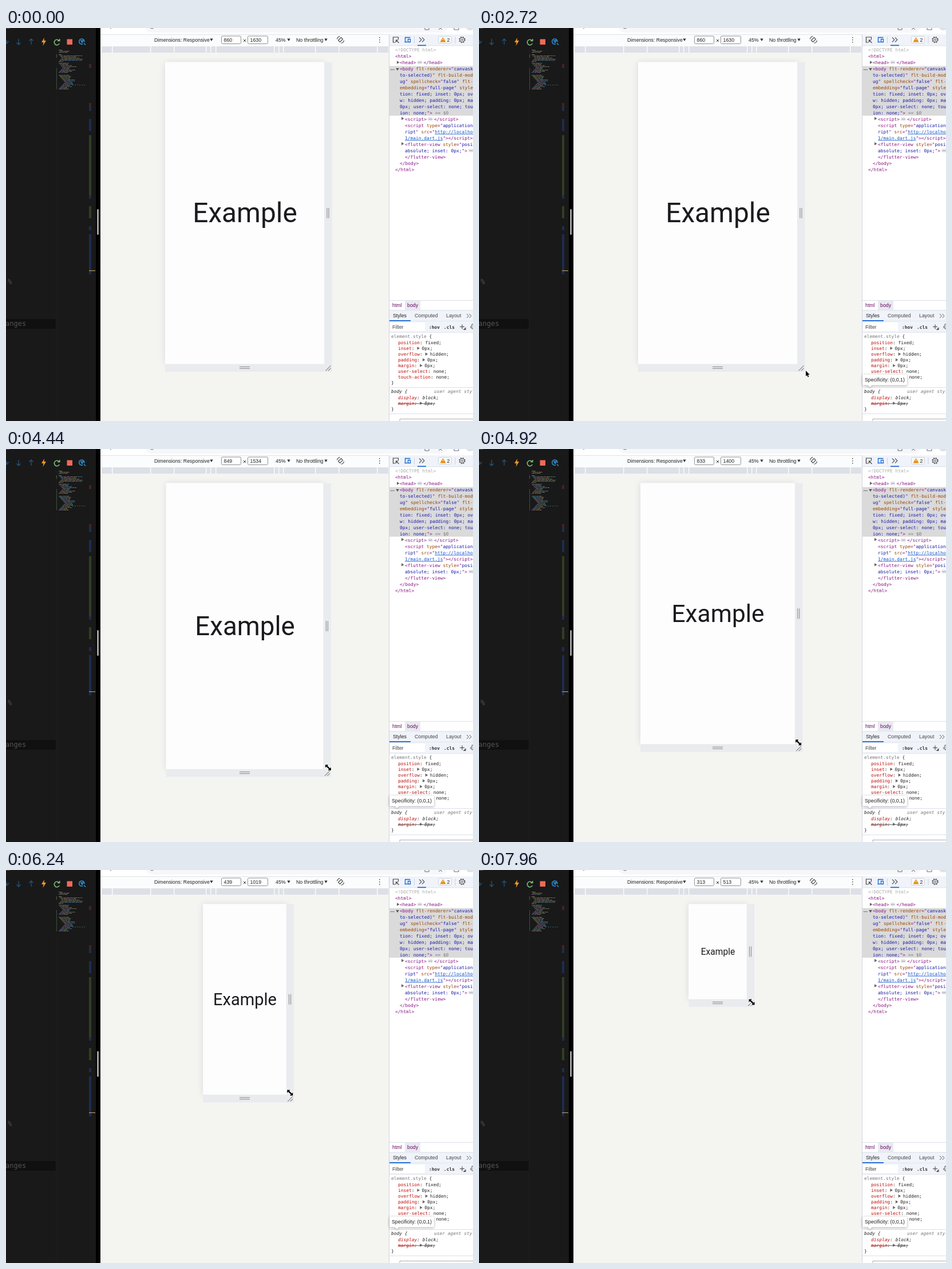
Recreate the animation shown at these times as an HTML page with a canvas. Size 816 by 686 pixels, loop 8000 ms.

```html
<!DOCTYPE html>
<html lang="en">
<head>
<meta charset="utf-8">
<title>Responsive resize</title>
<style>
html, body { margin: 0; width: 100%; height: 100%; overflow: hidden; background: #181818; }
canvas { display: block; }
</style>
</head>
<body>
<canvas id="stage" width="816" height="686"></canvas>
<script>
const ctx = document.getElementById('stage').getContext('2d');
const LOOP = 8000, ZOOM = 0.3232, CENTER = 417, TOP = 59.6;
const SANS = '8.8px "Liberation Sans", Arial, sans-serif';
const MONO = '7.88px "DejaVu Sans Mono", monospace';
const INK = { t: '#881280', a: '#994500', v: '#1a1aa6', g: '#a9a9a9', e: '#777', k: '#222', r: '#c00a0a', u: '#1155cc' };

function rect(x, y, w, h, color) {
  ctx.fillStyle = color;
  ctx.fillRect(x, y, w, h);
}
function round(x, y, w, h, r, fill, stroke) {
  ctx.beginPath();
  ctx.roundRect(x, y, w, h, r);
  if (fill) { ctx.fillStyle = fill; ctx.fill(); }
  if (stroke) { ctx.strokeStyle = stroke; ctx.lineWidth = 1; ctx.stroke(); }
}
function path(d, x, y, stroke, width = 1, fill) {
  const p = new Path2D(d);
  ctx.save();
  ctx.translate(x, y);
  if (stroke) { ctx.strokeStyle = stroke; ctx.lineWidth = width; ctx.stroke(p); }
  if (fill) { ctx.fillStyle = fill; ctx.fill(p); }
  ctx.restore();
}
function text(s, x, y, color = '#222', font = SANS) {
  ctx.font = font;
  ctx.fillStyle = color;
  ctx.fillText(s, x, y);
}
const down = (x, y) => path('M-2.7-2H2.7L0 2.5Z', x, y, null, 0, '#333');

// Segments are separated by "|"; the first letter picks the ink.
// "p" draws a folded-content pill and "f" an expander triangle.
function code(x, y, line, style = '') {
  for (const part of line.split('|')) {
    const kind = part[0], s = part.slice(1);
    if (kind === 'p') {
      round(x + 2, y - 6, 9, 6.5, 3, '#e4e7ee');
      for (let i = 0; i < 3; i++) rect(x + 4 + i * 2, y - 3.2, 1, 1, '#555');
      x += 13;
    } else if (kind === 'f') {
      path('M0-2.8L4.5 0 0 2.8Z', x + 5, y - 3, null, 0, '#666');
      x += 13;
    } else {
      text(s, x, y, INK[kind], style + ' ' + MONO);
      const w = ctx.measureText(s).width;
      if (kind === 'u') rect(x, y + 1, w, 0.8, INK.u);
      x += w;
    }
  }
}

function minimap() {
  let seed = 7;
  const random = () => (seed = seed * 16807 % 2147483647) / 2147483647;
  const tints = ['#3f6f8c', '#5d7d55', '#8a7550', '#707070', '#7a5a80'];
  for (const [top, rows, width] of [[38, 3, 22], [46, 7, 42], [61, 9, 24], [82, 13, 22]]) {
    for (let row = 0; row < rows; row++) {
      const depth = Math.min(row, rows - 1 - row);
      let x = 92 + depth * 1.8;
      const end = x + (depth ? width * (0.5 + random() * 0.5) : 5 + random() * 15);
      while (x < end) {
        const w = 2 + random() * 5;
        rect(x, top + row * 2, w, 1, tints[Math.floor(random() * 5)]);
        x += w + 0.8;
      }
    }
  }
  rect(88, 46, 1, 6, '#41613c');
  rect(88, 70, 1, 37, '#3d4c3c');
  for (let x = 116; x < 138; x += 4) rect(x, 99, 2, 1, '#385a70');
}

function editor() {
  rect(0, 0, 157, 686, '#191919');
  rect(157, 0, 8, 686, '#000');
  rect(0, 0, 7, 1, '#555');
  path('M-4 0A5 5 0 0 0 4 0', 91, -3, '#777');
  path('M-3-2L1 2 5-2M1 2V-4', 0, 25, '#24567d', 1.3);
  path('M0-5V5M-3.5 1.5L0 5 3.5 1.5', 22, 24, '#24567d', 1.3);
  path('M0 5V-5M-3.5-1.5L0-5 3.5-1.5', 44, 24, '#24567d', 1.3);
  path('M1-7L-4 1H-.5L-1.5 7 4-2H.5Z', 66, 24, null, 0, '#ef9a2d');
  path('M4.3 2A4.7 4.7 0 1 1 3.5-3.2M4.7-6V-2.5H1', 89, 25, '#79bf75', 1.6);
  rect(106.5, 19.5, 9.5, 9.5, '#ef6a57');
  path('M4 1A4.7 4.7 0 1 0 1 4.5M3 3L6 6M-2-1.5H2L0 2Z', 133, 23.5, '#2e94d8', 1.5);

  rect(87, 37, 0.6, 649, '#202020');
  minimap();

  const blue = '#1e2c50', green = '#303e25', red = '#452126';
  for (const [y, h, c] of [[63, 7, red], [131, 7, red], [138, 7, blue], [159, 21, blue], [187, 105, green],
    [292, 6, blue], [311, 21, green], [346, 7, blue], [360, 70, blue]]) rect(145, y, 4, h, c);
  rect(145, 423, 11, 1.2, '#b09a60');
  text('%', 3, 447, '#555', '12px "DejaVu Sans Mono", monospace');
  rect(0, 508, 87, 17, '#101010');
  text('anges', -1, 520, '#555', '12px "DejaVu Sans Mono", monospace');
  round(159, 316, 3, 45, 1.5, '#a2a2a2');
}

function browser(size) {
  rect(165, 0, 651, 11, '#fff');
  round(244, -12, 527, 20, 10, '#f6f7f8');
  path('M-4 0A5 5 0 0 0 4 0', 255, -1, '#777');
  path('M0 0L2 1', 182, 0, '#777');
  path('M-3 0A4 4 0 0 0 3 0', 226, -2, '#777');
  path('M-3-2V3H4V-2', 735, 0, '#667');
  path('M-3 3L0 0 3 3', 759, 0, '#667');
  path('M-4-2V3H4V-2', 787, 0, '#667');
  round(804, -8, 14, 12, 6, '#dfe2e5');

  rect(165, 11, 504, 21, '#fbfcfd');
  rect(165, 11, 651, 0.8, '#dadce0');
  text('Dimensions: Responsive', 259, 24);
  down(359, 20.5);
  for (const [x, w, value] of [[376, 35, size.w], [422, 36, size.h]]) {
    round(x + 0.5, 14, w - 1, 13.5, 2, '#fff', '#8d9196');
    text(Math.round(value), x + 4.5, 24);
  }
  path('M-2.2-2.2L2.2 2.2M2.2-2.2L-2.2 2.2', 417, 22, '#333');
  text('45%', 471, 24);
  down(494, 20.5);
  text('No throttling', 507, 24);
  down(559, 20.5);
  path('M-4 1L1-4 4-1-1 4ZM-6-1A6 6 0 0 1-1-6M6 1A6 6 0 0 1 1 6', 584.5, 20.5, '#444', 1.1);
  for (let y = 16; y < 27; y += 4) rect(652, y, 1.5, 1.5, '#444');

  rect(165, 32, 504, 654, '#f4f4f1');
  rect(167, 32, 501, 11, '#dde0e6');
  for (const x of [185, 252, 293, 349, 357, 366, 468, 476, 484, 540, 581, 648]) rect(x, 32, 1.5, 11, '#fafafa');
}

function device({ w, h }, hovered) {
  const pw = w * ZOOM, ph = h * ZOOM;
  const left = CENTER - pw / 2, right = left + pw, bottom = TOP + ph;
  const bar = hovered ? '#d3d6da' : '#e9ebee';
  ctx.save();
  ctx.shadowColor = 'rgba(60,70,110,.14)';
  ctx.shadowBlur = 10;
  rect(left, TOP, pw, ph, '#fdfdfd');
  ctx.restore();
  rect(right, TOP, 13.5, ph + 13.5, bar);
  rect(left, bottom, pw, 13.5, bar);
  rect(left, TOP, pw, ph, '#fdfdfd');
  const midY = TOP + ph / 2;
  for (const d of [5, 8]) {
    rect(right + d - 0.5, midY - 9, 1, 18, '#858585');
    rect(CENTER - 9, bottom + d - 0.5, 18, 1, '#858585');
  }
  path('M-4.5 4.5L4.5-4.5M0 4.5L4.5 0', right + 7, bottom + 7.5, '#858585', 1.1);

  const font = Math.hypot(pw, ph) * 0.0802;
  ctx.textAlign = 'center';
  text('Example', CENTER + 0.5, midY + font * 0.34, '#1b1b1f', font + 'px Roboto, sans-serif');
  ctx.textAlign = 'left';
}

function devtools() {
  rect(669, 11, 147, 675, '#fff');
  rect(669, 11, 147, 20, '#f0f3f9');
  rect(669, 30.5, 147, 0.8, '#d3d9e5');
  path('M-1 4H-5V-5H4V-1M0 0L5 5M0 4V0H4', 681.5, 21, '#444', 1.2);
  path('M-3-3V-4H5M-5 4H0M-4 4V-4H4M1-1H5V4H1Z', 701.5, 20.5, '#1769d2', 1.3);
  rect(713, 15, 1, 12, '#cbd2df');
  path('M-4-4L0 0-4 4M1-4L5 0 1 4', 726, 20.5, '#555', 1.1);
  rect(719, 29.5, 15, 1.7, '#1967d2');
  round(755.5, 14.5, 23, 12, 2, '#f7f8fb', '#d0d4dc');
  path('M0-4.5L5 4H-5Z', 763.5, 20.5, null, 0, '#e68a00');
  rect(763, 18.5, 1, 3, '#fff');
  text('2', 770.5, 23.5);
  rect(784.5, 15, 1, 12, '#cbd2df');
  ctx.setLineDash([2, 1.9]);
  path('M4.9 0A4.9 4.9 0 1 1-4.9 0A4.9 4.9 0 1 1 4.9 0', 797, 20.5, '#555', 1.6);
  ctx.setLineDash([]);
  path('M4 0A4 4 0 1 1-4 0A4 4 0 1 1 4 0M1.5 0A1.5 1.5 0 1 1-1.5 0A1.5 1.5 0 1 1 1.5 0', 797, 20.5, '#555');

  rect(670, 66.5, 146, 86.5, '#dadadb');
  [
    [680, 'g<!DOCTYPE html>'],
    [680, 't<html>'],
    [688, 't<head>|p|t</head>'],
    [688, 't<body |aflt-renderer|t="|vcanvaskit'],
    [688, 'vto-selected)|t" |aflt-build-mode'],
    [688, 'vug|t" |aspellcheck|t="|vfalse|t" |aflt-'],
    [688, 'aembedding|t="|vfull-page|t" |astyle'],
    [688, 'vtion: fixed; inset: 0px; ove'],
    [688, 'vw: hidden; padding: 0px; mar'],
    [688, 'v0px; user-select: none; touc'],
    [688, 'vion: none;|t">|e == $0'],
    [697, 't<script>|p|t<\/script>'],
    [697, 't<script |atype|t="|vapplication'],
    [697, 'vript|t" |asrc|t="|uhttp://localhos'],
    [697, 'u1/main.dart.js|t"><\/script>'],
    [697, 't<flutter-view |astyle|t="|vposi'],
    [697, 'vabsolute; inset: 0px;|t">|p'],
    [697, 't</flutter-view>'],
    [688, 't</body>'],
    [680, 't</html>']
  ].forEach(([x, line], i) => code(x, 40.8 + i * 11, line));
  for (const [x, y] of [[683, 60], [691, 158], [691, 202]]) path('M0-2.8L4.5 0 0 2.8Z', x, y, null, 0, '#666');
  path('M-2.8-2H2.8L0 2.5Z', 684, 72, null, 0, '#555');
  for (let x = 672; x < 679; x += 2.5) rect(x, 72, 1.4, 1.4, '#555');

  rect(669, 475, 147, 0.8, '#d3d9e5');
  rect(697, 476, 27, 16, '#e9eaf0');
  text('html', 675, 486.5, '#690a68');
  text('body', 701, 486.5, '#690a68');
  rect(669, 492.5, 147, 19.5, '#f0f3f9');
  rect(669, 492.5, 147, 0.8, '#d3d9e5');
  rect(669, 511.5, 147, 0.8, '#d3d9e5');
  text('Styles', 676, 505);
  text('Computed', 714, 505, '#444');
  text('Layout', 769, 505, '#444');
  path('M-4-3.5L-.5 0-4 3.5M.5-3.5L4 0 .5 3.5', 809, 502.5, '#555');
  rect(670, 510, 37, 1.8, '#1967d2');

  rect(670, 512.3, 146, 18.5, '#f0f3f9');
  rect(671, 514, 61, 15, '#fff');
  rect(669, 530.8, 147, 0.8, '#d3d9e5');
  text('Filter', 675, 524.5, '#444');
  text(':hov', 739, 524.5, '#333', 'bold ' + MONO);
  text('.cls', 765, 524.5, '#333', 'bold ' + MONO);
  path('M-4 0H4M0-4V4M3 5H6V2Z', 797, 521.5, '#444', 1.1);
  path('M4-4H-1V4H4M-3-1V3', 815, 521, '#555');

  code(673, 540.8, 'eelement.style |k{');
  ['rposition|k: fixed;', 'rinset|k:|f|k0px;', 'roverflow|k:|f|khidden;', 'rpadding|k:|f|k0px;',
    'rmargin|k:|f|k0px;', 'ruser-select|k: none;', 'rtouch-action|k: none;'
  ].forEach((line, i) => code(685, 552 + i * 10.07, line));
  code(673, 622, 'k}');
  rect(669, 627, 147, 0.8, '#d3d9e5');
  code(673, 637, 'kbody {', 'italic');
  code(748, 637, 'euser agent styl', 'italic');
  code(685, 648, 'rdisplay|k: block;', 'italic');
  code(685, 658, 'rmargin|k:|f|k8px;', 'italic');
  rect(685, 655.3, 65, 0.9, '#555');
  code(673, 668, 'k}');
  rect(669, 673, 147, 0.8, '#d3d9e5');
  ctx.setLineDash([1.5, 1]);
  path('M0 4V0H130', 688, 682.5, '#777');
  ctx.setLineDash([]);
  rect(669, 11, 0.8, 675, '#c5cad4');
}

function tooltip() {
  ctx.save();
  ctx.shadowColor = 'rgba(0,0,0,.35)';
  ctx.shadowBlur = 4;
  ctx.shadowOffsetY = 1;
  round(670, 605, 78, 18.5, 2, '#fff');
  path('M-4 0L0 4 4 0Z', 683, 623, null, 0, '#fff');
  ctx.restore();
  rect(671, 619, 76, 4, '#fff');
  text('Specificity: (0,0,1)', 674, 617);
}

const POINTERS = {
  ibeam: 'M-3-5Q0-5 0-3Q0-5 3-5M0-3V4M-3 6Q0 6 0 4Q0 6 3 6M-1.5 1H1.5',
  arrow: 'M0 0V10L2.2 8 3.8 11.5 5.4 10.7 3.8 7.4H7Z',
  resize: 'M-5-5H.5L-1.4-3.1 3.1 1.4 5-.5V5H-.5L1.4 3.1-3.1-1.4-5 .5Z'
};
function pointer(kind, x, y) {
  if (kind === 'ibeam') {
    path(POINTERS.ibeam, x, y, '#fff', 2.4);
    path(POINTERS.ibeam, x, y, '#111', 1.1);
  } else path(POINTERS[kind], x, y, '#fff', 1.8, '#000');
}

// Linear interpolation through [time, a, b] keys.
function track(keys, t) {
  const i = keys.findIndex(k => k[0] > t);
  if (i === 0) return keys[0].slice(1);
  if (i < 0) return keys[keys.length - 1].slice(1);
  const [p, q] = [keys[i - 1], keys[i]], f = (t - p[0]) / (q[0] - p[0]);
  return [1, 2].map(n => p[n] + (q[n] - p[n]) * f);
}
const HOVER_START = 2780, DRAG_START = 4100;
const SIZES = [[DRAG_START, 860, 1630], [4920, 833, 1400], [6240, 439, 1019], [7820, 313, 513]];
const MOVES = [[700, 822, 668], [1100, 745, 638], [1280, 731, 634], [1650, 688, 634], [2150, 684, 633],
  [2600, 582, 601], [2720, 571, 598], [2900, 565, 592]];
function sizeAt(t) {
  const [w, h] = track(SIZES, t);
  return { w, h };
}

// The pointer leads the size readout, and the page trails it.
function draw(t) {
  const size = sizeAt(t);
  browser(size);
  device(sizeAt(t - 35), t > HOVER_START && t < DRAG_START);
  devtools();
  editor();
  if (t > 2100) tooltip();
  if (t < HOVER_START) {
    const [x, y] = track(MOVES, t);
    if (t > 700) pointer(x > 670 ? 'ibeam' : 'arrow', x, y);
  } else if (t < DRAG_START - 50) {
    pointer('resize', ...track(MOVES, t));
  } else {
    const lead = sizeAt(t + 50);
    pointer('resize', CENTER + lead.w * ZOOM / 2 + 9, TOP + lead.h * ZOOM + 5);
  }
}

function tick() {
  draw(performance.now() % LOOP);
  requestAnimationFrame(tick);
}
tick();
</script>
</body>
</html>
```
